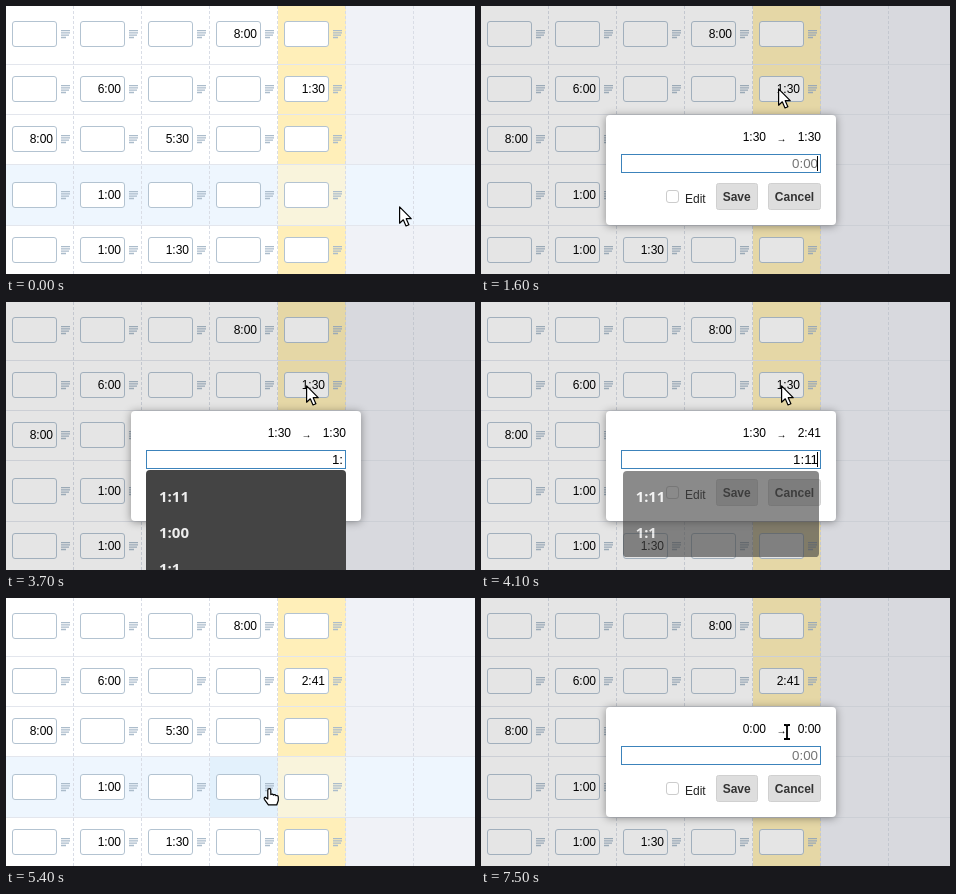
Write an HTML page that moves like this. It is 469x268 px and loops after 8000 ms.

```html
<!DOCTYPE html>
<html lang="en">
<head>
<meta charset="utf-8">
<title>Timesheet entry</title>
<style>
  html, body { margin: 0; width: 100%; height: 100%; overflow: hidden; background: #fff; }
  svg { display: block; }
  text { font: 12px "Liberation Sans", Arial, sans-serif; fill: #000; white-space: pre; }
  .end { text-anchor: end; }
  .mid { text-anchor: middle; }
  .bold { font-weight: bold; fill: #333; }
  .field { fill: #fff; stroke: #b3c3d1; }
  .field.focus { stroke: #2f84c0; }
  .icon { stroke: #abbccb; stroke-width: 1.3; fill: none; }
  .row-line { stroke: #e3e6ed; }
  .col-line { stroke: #d9dde6; stroke-dasharray: 3 2; }
  .entry { font-size: 13.333px; }
  .menu text { font: 600 15px "Noto Sans", "Open Sans", sans-serif; fill: #eee; }
  .button { fill: #dedede; stroke: #d0d0d0; }
  #menu { transform-origin: 240px 212px; }
  #dialog-box { filter: drop-shadow(0 1px 4px rgba(0, 0, 0, .4)); }
  .pointer { fill: #fff; stroke: #000; stroke-width: 1.2; stroke-linejoin: round; }
</style>
</head>
<body>
<svg id="stage" width="469" height="268" viewBox="0 0 469 268">
  <g id="grid"></g>
  <path id="cell-caret" stroke="#000"/>
  <rect id="shade" width="469" height="268" fill="#000" opacity=".1"/>

  <g id="dialog">
    <rect id="dialog-box" x="125" y="109" width="230" height="110" rx="4" fill="#fff"/>
    <text id="before" class="end" x="285" y="135"></text>
    <text class="mid" x="300.5" y="136" style="font-size:10px">→</text>
    <text id="after" class="end" x="340" y="135"></text>
    <rect x="140.5" y="148.5" width="199" height="18" fill="#fff" stroke="#3c83bb"/>
    <text id="entry" class="entry end" x="337" y="162"></text>
    <path id="caret" d="M336.5 150V165" stroke="#000"/>
    <rect x="185.5" y="184.5" width="12" height="12" rx="2.5" fill="#fff" stroke="#ccc"/>
    <text x="204" y="197" style="fill:#222">Edit</text>
    <rect class="button" x="235.5" y="177.5" width="41" height="26" rx="2"/>
    <text class="bold mid" x="255.7" y="195">Save</text>
    <rect class="button" x="287.5" y="177.5" width="52" height="26" rx="2"/>
    <text class="bold mid" x="313.5" y="195">Cancel</text>
    <g id="menu" class="menu">
      <rect id="menu-box" x="140" y="168" width="200" rx="4" fill="#444"/>
      <text x="153" y="200"></text>
      <text x="153" y="236"></text>
      <text x="153" y="272"></text>
    </g>
  </g>

  <g id="cursor">
    <path id="arrow" class="pointer" d="M.6 .9V17.2L4.3 13.8L7 20L9.9 18.8L7.2 12.7H12.2Z"/>
    <path id="hand" class="pointer" d="M-1.2 8V1.2Q-1.2 -.4 .3 -.4T1.8 1.2V5.6Q3.2 4.4 4.5 6Q6 5 7 6.6Q9.3 6 9.3 8.6V11.5L7.8 15.8H-.6L-4.6 10.3Q-5.4 8.6 -3.6 8.2L-1.2 10Z"/>
    <g id="beam" fill="none">
      <path d="M-3.5 -7H-1L0 -6L1 -7H3.5M0 -6V6M-3.5 7H-1L0 6L1 7H3.5" stroke="#fff" stroke-width="3.2"/>
      <path d="M-3 -7H-1L0 -6L1 -7H3M0 -6V6M-3 7H-1L0 6L1 7H3" stroke="#000" stroke-width="1.8"/>
    </g>
  </g>
</svg>
<script>
const LOOP = 8000, TICK = 100, COL = 68, TODAY = 4;
const rowTops = [0, 59, 109, 159, 220, 270];
const fieldTops = [15, 70, 120, 176, 231];
const hours = [
  ['', '', '', '8:00', ''],
  ['', '6:00', '', '', '1:30'],
  ['8:00', '', '5:30', '', ''],
  ['', '1:00', '', '', ''],
  ['', '1:00', '1:30', '', '']
];
// time, x, y of the pointer's hot spot
const path = [
  [0, 393, 200], [900, 298, 85], [1000, 296, 83], [1200, 296, 83],
  [1300, 293, 80], [1500, 293, 80], [1700, 300, 83], [4500, 300, 83],
  [5100, 263, 191], [5900, 263, 191], [6600, 306, 130],
  [7200, 306, 130], [7300, 306, 134], [LOOP, 306, 134]
];
const typed = [[0, ''], [2400, '1'], [3100, '1:'], [3900, '1:1'], [4000, '1:11'], [5400, '']];
const choices = {
  '1': ['1:11', '1:00', '1'],
  '1:': ['1:11', '1:00', '1:1'],
  '1:1': ['1:11', '1:1'],
  '1:11': ['1:11', '1:1']
};
const caretOff = [[1900, 2400], [3700, 3900], [4600, 5100], [7500, LOOP]];

const $ = id => document.getElementById(id);
const show = (el, on) => el.style.display = on ? '' : 'none';
const within = (v, a, b) => v >= a && v < b;

function add(tag, attrs, parent = $('grid')) {
  const el = document.createElementNS('http://www.w3.org/2000/svg', tag);
  for (const k in attrs) el.setAttribute(k, attrs[k]);
  return parent.appendChild(el);
}

const cells = [], fields = [], labels = [];
for (let r = 0; r < 5; r++) {
  cells.push(Array.from({ length: 7 }, (_, c) => add('rect', {
    x: c * COL, y: rowTops[r], width: COL, height: rowTops[r + 1] - rowTops[r]
  })));
}
for (let r = 1; r < 5; r++) add('path', { class: 'row-line', d: `M0 ${rowTops[r] - .5}H469` });
for (let c = 1; c < 7; c++) add('path', { class: 'col-line', d: `M${c * COL - .5} 0V268` });
hours.forEach((row, r) => {
  const y = fieldTops[r];
  fields[r] = [];
  labels[r] = [];
  row.forEach((value, c) => {
    const x = c * COL;
    fields[r][c] = add('rect', { class: 'field', x: x + 6.5, y: y + .5, width: 44, height: 25, rx: 2.5 });
    labels[r][c] = add('text', { class: 'end', x: x + 47, y: y + 17 });
    labels[r][c].textContent = value;
    add('path', { class: 'icon', d: `M${x + 55} ${y + 9.6}h9m-9 2.3h9m-9 2.3h8m-8 2.3h5` });
  });
});

function pointerAt(t) {
  const i = path.findIndex(p => p[0] > t);
  const [t0, x0, y0] = path[i - 1], [t1, x1, y1] = path[i];
  const u = (t - t0) / (t1 - t0), k = u * u * (3 - 2 * u);
  return [Math.round(x0 + (x1 - x0) * k), Math.round(y0 + (y1 - y0) * k)];
}

function fillOf(c, inRow, inCell) {
  if (c === TODAY) return inCell ? '#eeeedd' : inRow ? '#f9f4dc' : '#ffefb9';
  if (inCell && c < TODAY) return '#e3f1fc';
  if (inRow) return '#eef6fe';
  return c > TODAY ? '#f0f2f7' : '#fff';
}

function pointerKind(x, y, row, col, dialog, shaded) {
  if (dialog) {
    if (within(y, 177, 204) && (within(x, 235, 277) || within(x, 287, 340))) return 'hand';
    const onText = within(y, 123, 139) && within(x, 261, 341);
    const onEntry = within(y, 148, 167) && within(x, 140, 340);
    return onText || onEntry ? 'beam' : 'arrow';
  }
  if (shaded) return 'hand';
  if (col > TODAY) return 'arrow';
  const top = fieldTops[row], left = col * COL + 6;
  return within(y, top, top + 26) && within(x, left, left + 45) ? 'beam' : 'hand';
}

function draw(t) {
  const shaded = within(t, 1300, 5400) || t >= 6900;
  const dialog = within(t, 1300, 5200) || t >= 6900;
  const [x, y] = pointerAt(t);
  const row = rowTops.findIndex(top => top > y) - 1, col = Math.floor(x / COL);

  cells.forEach((line, r) => line.forEach((cell, c) => {
    const inRow = !shaded && r === row;
    cell.setAttribute('fill', fillOf(c, inRow, inRow && c === col));
  }));
  labels[1][TODAY].textContent = t < 5400 ? '1:30' : '2:41';

  const first = within(t, 1200, 1300), second = within(t, 6800, 6900);
  fields[1][TODAY].classList.toggle('focus', first);
  fields[2][TODAY].classList.toggle('focus', second);
  show($('cell-caret'), first || second);
  $('cell-caret').setAttribute('d', first ? 'M302.5 76V90' : 'M318.5 126V140');

  show($('shade'), shaded);
  show($('dialog'), dialog);
  const text = typed.filter(k => k[0] <= t).pop()[1];
  $('before').textContent = t < 5400 ? '1:30' : '0:00';
  $('after').textContent = t >= 5400 ? '0:00' : t < 4000 ? '1:30' : '2:41';
  $('entry').textContent = text || '0:00';
  $('entry').style.fill = text ? '#000' : '#757575';
  show($('caret'), !caretOff.some(([a, b]) => within(t, a, b)));

  const list = choices[text] || [];
  const fade = Math.min(1, Math.max(0, (t - 4000) / 265));
  show($('menu'), list.length && fade < 1);
  $('menu').style.opacity = 1 - fade;
  $('menu').style.transform = `scale(${1 - fade * .053})`;
  $('menu-box').setAttribute('height', 16 + 36 * list.length);
  $('menu').querySelectorAll('text').forEach((el, i) => el.textContent = list[i] || '');

  const kind = pointerKind(x, y, row, col, dialog, shaded);
  for (const id of ['arrow', 'hand', 'beam']) show($(id), id === kind);
  $('cursor').setAttribute('transform', `translate(${x} ${y})`);
}

const start = performance.now();
function frame() {
  const t = Math.max(0, performance.now() - start) % LOOP;
  draw(Math.floor(t / TICK) * TICK);
  requestAnimationFrame(frame);
}
frame();
</script>
</body>
</html>
```
